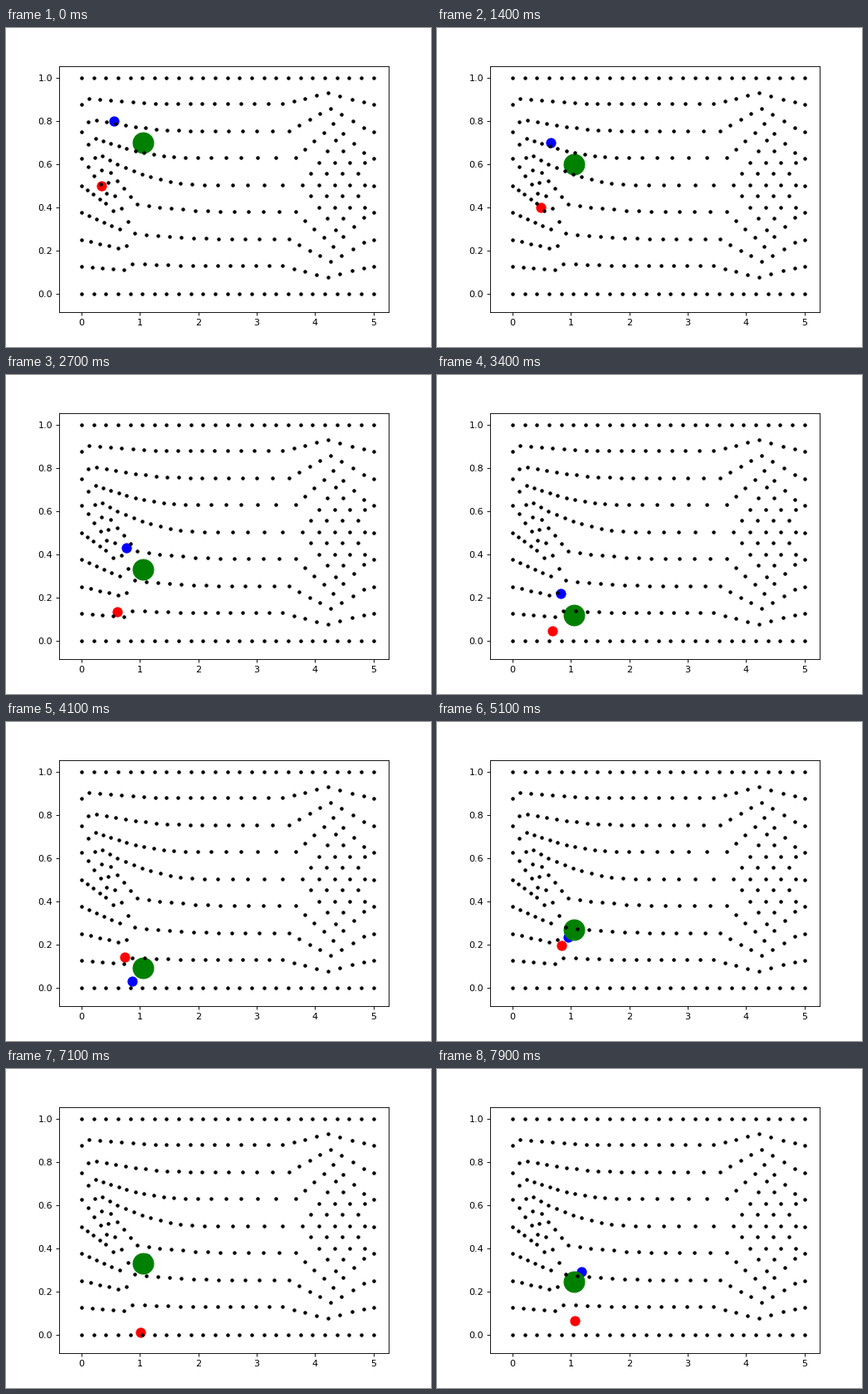
Write a matplotlib script that moves like this. It is 512 px wide and 384 px high and loops after 8 s.

```python
import numpy as np
import matplotlib.pyplot as plt
from matplotlib.animation import FuncAnimation

STEPS = 80
LIFT = 0.003  # flat parts of the mesh sit slightly above the n/8 levels


def line(x0, y0, x1, y1, n):
    return np.linspace((x0, y0), (x1, y1), n)


def border():
    return [line(0, 0, 5, 0, 25), line(0, 1, 5, 1, 25),
            line(0, 0.125, 0, 0.875, 7), line(5, 0.125, 5, 0.875, 7)]


def row_end(m):
    return 3.44 + 0.112 * (m - 1)


def row(j, x0, rise, n):
    """Row j from the top: starts dense and raised, then flattens and widens."""
    u = np.arange(n + 1) / n
    dense = min(4 * rise, 0.36)
    x = x0 + (row_end(min(j, 8 - j)) - x0) * (u - dense * (u - u**3))
    bend = np.clip(1 - (x - x0) / 1.75, 0, 1) ** 2
    return np.column_stack([x, 1 - j / 8 + LIFT + rise * bend])


def peak(m):
    """Roof-shaped end of row m."""
    base = 1 - m / 8 + LIFT
    x, y = 4.22 + 0.045 * (m - 1), 0.93 - 0.072 * (m - 1)
    up = line(row_end(m), base, x, y, 5)[1:]
    down = line(x, y, 4.833, base + 0.008 * m, 4)[1:]
    return np.vstack([up, down])


def mirror(pts):
    return pts * (1, -1) + (0, 1 + 2 * LIFT)


def diamond():
    """Staggered nodes inside the roofs."""
    pts = []
    for r in range(-4, 5):
        a = abs(r)
        n = (4, 4, 4, 2, 1)[a]
        gap = 0.27 if a % 2 else 0.26
        first = 3.925 if a == 1 else 4.07 + 0.14 * max(a - 2, 0)
        pts += [(first + gap * i, 0.503 + 0.052 * r) for i in range(n)]
    return np.array(pts)


def fan(k, n):
    """Short row sloping down from the left border."""
    i = np.arange(1, n + 1)
    return np.column_stack([i * (0.104 + 0.026 * k),
                            0.5 - k / 8 - i * (0.0205 - 0.0055 * k)])


def mesh():
    starts = [(0.13, 0.026, 16), (0.26, 0.05, 16), (0.245, 0.09, 17),
              (0.36, 0.134, 17), (0.955, 0.037, 12), (0.91, 0.025, 12),
              (0.87, 0.011, 12)]
    rows = [row(j, *s) for j, s in enumerate(starts, 1)]
    roofs = [peak(m) for m in (1, 2, 3)]
    fans = [fan(k, n) for k, n in enumerate((4, 5, 4, 4))]
    links = [line(0.115, 0.587, 0.43, 0.464, 4),
             line(0.23, 0.63, 0.685, 0.395, 5),
             line(0.5, 0.56, 0.84, 0.449, 4),
             line(0.54, 0.383, 0.8, 0.333, 2),
             line(0.115, 0.795, 0.115, 0.691, 2),
             [(0.77, 0.222)]]
    return np.vstack(border() + rows + roofs + [mirror(p) for p in roofs]
                     + [diamond()] + fans + links)


def fall(x, y, vx, g, bounce, grip):
    """Positions of a bouncing body, one row per time step."""
    vy, path = 0.0, []
    for _ in range(STEPS):
        path.append((x, y))
        vy -= g
        x += vx
        y += vy
        if y < 0:
            y *= -0.77
            vy *= -bounce
            vx *= grip
    return np.array(path)


# colour, marker area, motion
BODIES = [
    ("red", 100, fall(0.342, 0.5, 0.0102, 0.00097, 0.6244, 0.865)),
    ("blue", 100, fall(0.551, 0.8, 0.0079, 0.00098, 0.689, 1)),
    ("green", 500, fall(1.054, 0.7, 0, 0.00098, 0.7, 1)),
]

fig, ax = plt.subplots(figsize=(6.4, 4.8), dpi=80)
balls = [ax.scatter(*path[0], s=size, c=color) for color, size, path in BODIES]
ax.plot(*mesh().T, "k.")
ax.set_xlim(-0.3816, 5.2563)
ax.set_ylim(-0.0848, 1.0524)


def update(i):
    for ball, (_, _, path) in zip(balls, BODIES):
        ball.set_offsets(path[i])
    return balls


anim = FuncAnimation(fig, update, frames=STEPS, interval=100,
                     repeat=True, repeat_delay=0)
plt.show()
```
